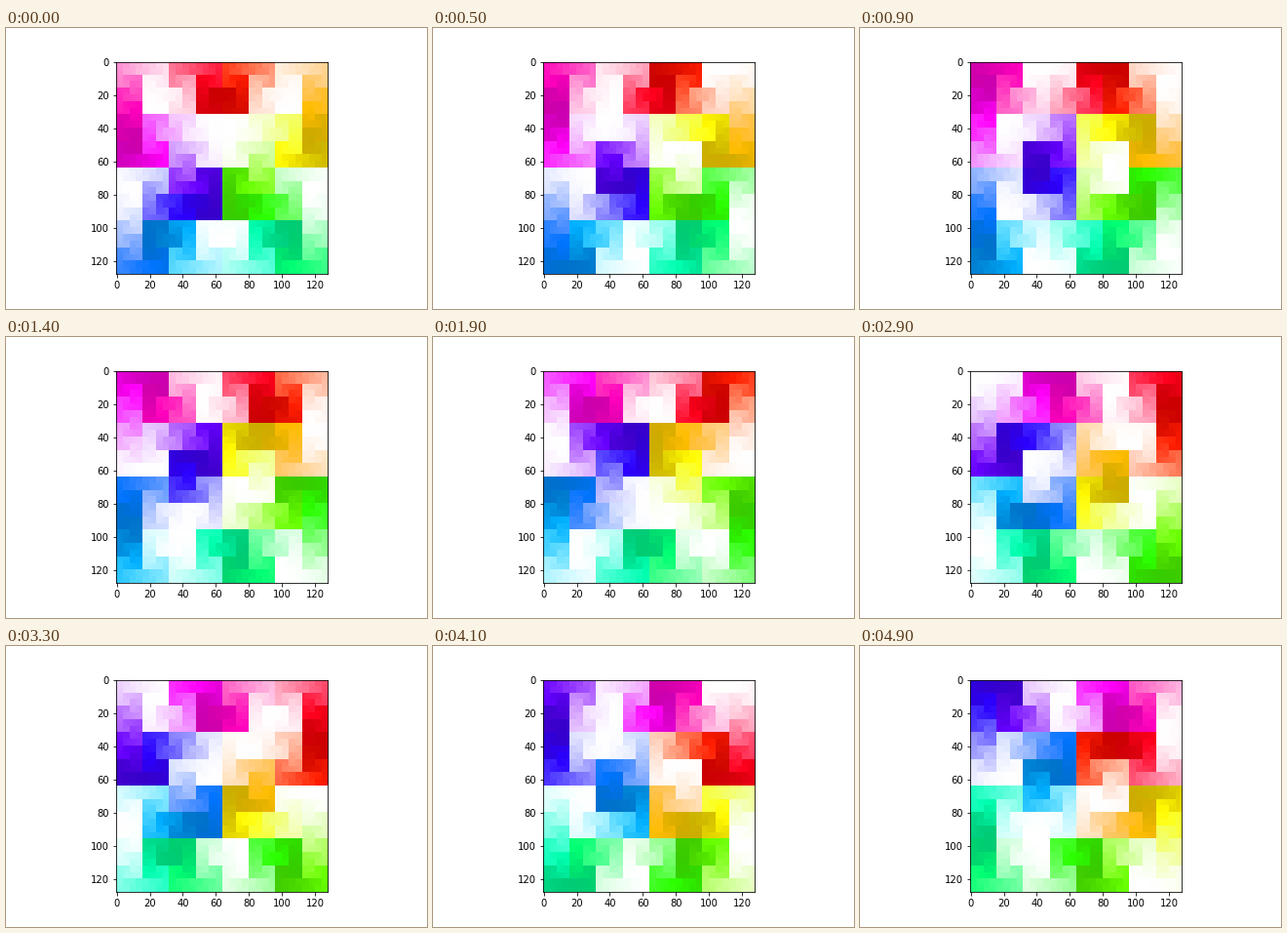
A matplotlib script for the animation above (5 s loop, 432x288 px).

```python
import numpy as np
import matplotlib.pyplot as plt
from matplotlib.animation import FuncAnimation

FRAMES = 50
INTERVAL = 100
STEP = 1 / 250  # share of the closed curve travelled per frame
WAVES = 7       # light/dark waves along one trip round the hue circle
ORDER = 6       # each quadrant is 2**ORDER cells wide


def backward(index):
    return index.size - 1 - index


def join(first, second, third, fourth):
    """Place four visits in the order bottom-left, bottom-right, top-right, top-left."""
    n = first.size
    return np.block([[fourth + 3 * n, third + 2 * n],
                     [first, second + n]])


def corner_curve(order):
    """Visiting order of a square entered on the left and left at the top."""
    corner = opposite = np.zeros((1, 1), dtype=int)
    for _ in range(order):
        rest = (backward(corner).T, np.rot90(corner), np.fliplr(corner))
        corner, opposite = (
            join(np.rot90(opposite, -1), *rest),
            join(np.rot90(backward(corner), 2), *rest),
        )
    return corner


def closed_curve(order):
    """Position 0..1 of every cell along a closed beta-omega curve."""
    quad = corner_curve(order)
    n = quad.size
    index = np.block([
        [np.rot90(backward(quad), 2) + 3 * n, np.flipud(quad)],
        [np.fliplr(quad) + 2 * n, backward(quad) + n],
    ])
    return index / index.size


def colorize(t):
    """Fully saturated HLS colours with lightness waving between 0.4 and 1."""
    h = 6 * (t % 1)
    light = (0.7 - 0.3 * np.cos(2 * np.pi * WAVES * t))[..., None]
    pure = np.stack([np.abs(h - 3) - 1, 2 - np.abs(h - 2), 2 - np.abs(h - 4)], axis=-1)
    pure = np.clip(pure, 0, 1)
    rgb = np.where(light < 0.5, 2 * light * pure, pure + (1 - pure) * (2 * light - 1))
    return np.clip(rgb, 0, 1)


position = closed_curve(ORDER)

fig, ax = plt.subplots(figsize=(6, 4), dpi=72, facecolor="white")
fig.subplots_adjust(left=0.125, right=0.9, bottom=0.125, top=0.88)
image = ax.imshow(colorize(position), interpolation="nearest")
ax.set_xticks(range(0, 128, 20))
ax.set_yticks(range(0, 128, 20))


def update(frame):
    image.set_data(colorize(position - frame * STEP))
    return [image]


anim = FuncAnimation(fig, update, frames=FRAMES, interval=INTERVAL,
                     repeat=True, repeat_delay=0)
plt.show()
```
